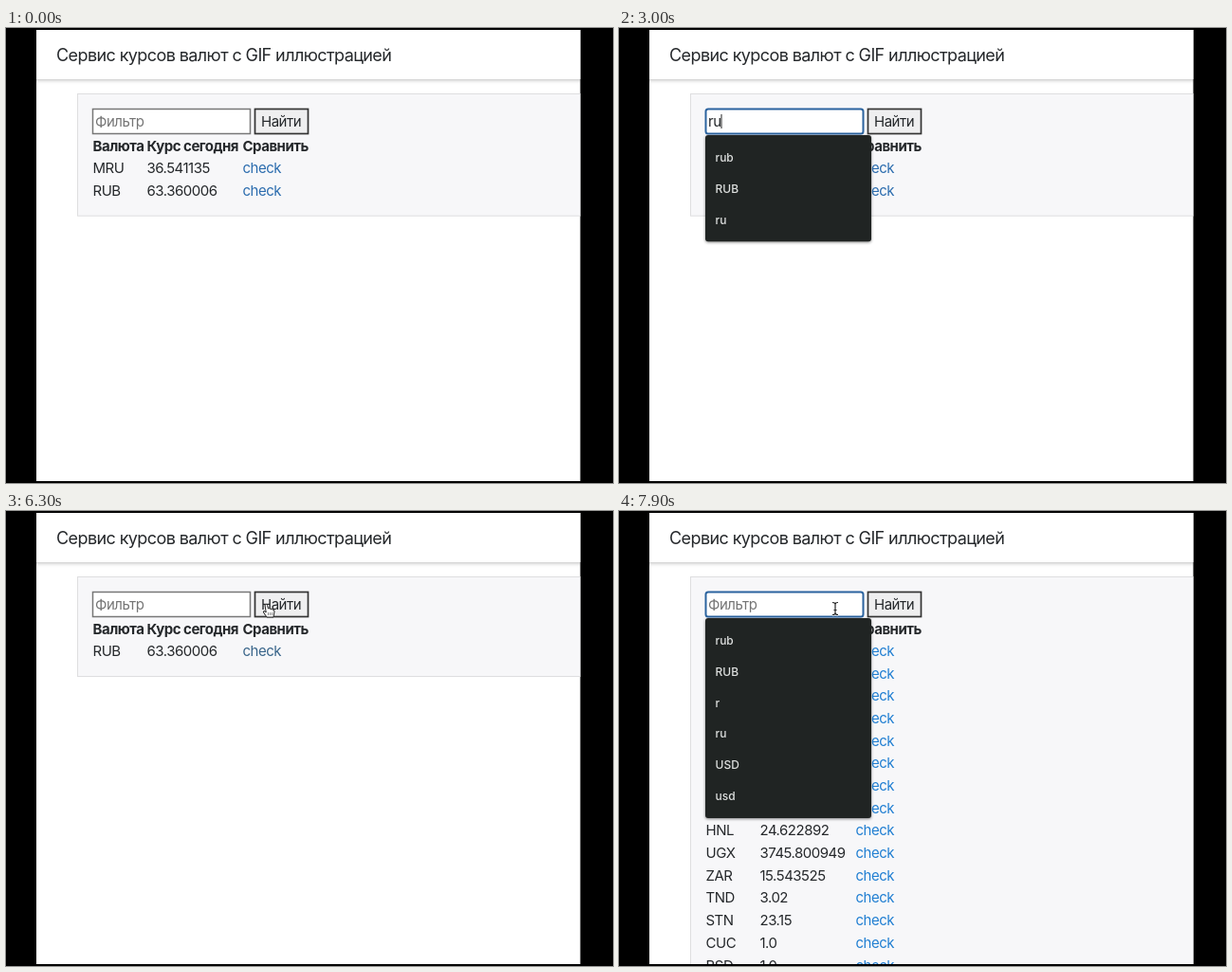
Animation of 640x480 px, one loop 8000 ms. Source, as an HTML page:

```html
<!DOCTYPE html>
<html lang="ru">
<head>
<meta charset="utf-8">
<style>
html, body { margin: 0; width: 100%; height: 100%; overflow: hidden; background: #000; }
svg { display: block; width: 640px; height: 480px; }
text { font: 15px Inter, sans-serif; letter-spacing: -.033em; fill: #25282b; white-space: pre; }
.title { font-size: 18px; }
.head { font-weight: 700; }
.hint { fill: #757575; }
.option { font-size: 12px; font-weight: 500; letter-spacing: 0; fill: #dfe1e0; }
</style>
</head>
<body>
<svg id="stage" viewBox="0 0 640 480"></svg>
<script>
const stage = document.getElementById('stage');
const LOOP = 8000, PITCH = 23.68;

const pair = [['MRU', '36.541135'], ['RUB', '63.360006']];
const all = `FJD 2.1368,MXN 19.54515,STD 22994.0,SCR 12.910622,CDF 2004.038697,BBD 2.0,GTQ 7.710011,
CLP 811.81,HNL 24.622892,UGX 3745.800949,ZAR 15.543525,TND 3.02,STN 23.15,CUC 1.0,BSD 1.0`
  .split(',').map(row => row.trim().split(' '));
const history = ['rub', 'RUB', 'r', 'ru', 'USD', 'usd'];

const text = (x, y, str, cls = '', style = '') =>
  `<text x="${x}" y="${y}" class="${cls}" style="${style}">${str}</text>`;
const rect = (x, y, w, h, attrs) =>
  `<rect x="${x}" y="${y}" width="${w}" height="${h}" ${attrs}/>`;
const between = (t, a, b) => t >= a && t < b;
const glide = (t, start, end, from, to) => {
  const p = Math.min(1, Math.max(0, (t - start) / (end - start)));
  const k = p * p * (3 - 2 * p);
  return from.map((v, i) => v + (to[i] - v) * k);
};

function table(rows, linkColor) {
  return rows.map(([code, rate], i) => {
    const y = 153 + i * PITCH;
    return text(91.5, y, code) + text(148.5, y, rate) + text(249.5, y, 'check', '', `fill:${linkColor}`);
  }).join('');
}

function field(query, focused, caret) {
  const border = focused
    ? 'rx="2.5" fill="#fff" stroke="#2b639f" stroke-width="2"'
    : 'fill="#fff" stroke="#777" stroke-width="1.5"';
  const n = query.length;
  return rect(91.5, 85.5, 166, 26, border)
    + text(94, 104, query || 'Фильтр', query ? '' : 'hint')
    + (caret ? rect(93.5 + (n && 8.5 * n - 3), 91, 1, 15, 'fill="#222"') : '');
}

function dropdown(query) {
  const options = history.filter(o => o.toLowerCase().startsWith(query));
  return rect(91, 113, 175, 13.5 + 32.9 * options.length,
    'rx="3" fill="#202423" style="filter:drop-shadow(0 1px 1.5px #0007)"')
    + options.map((o, i) => text(101.5, 141 + 32.8 * i, o, 'option')).join('');
}

function beam([x, y]) {
  const d = 'M-3-6.5Q0-6.5 0-4.5Q0-6.5 3-6.5M0-5V5M-3 6.5Q0 6.5 0 4.5Q0 6.5 3 6.5M-1.5 1.5H1.5';
  return `<g transform="translate(${x} ${y})" fill="none">
    <path d="${d}" stroke="#fff" stroke-width="2.6"/><path d="${d}" stroke="#222" stroke-width="1.2"/></g>`;
}

function hand([x, y]) {
  return `<path transform="translate(${x} ${y})" fill="#fff" stroke="#222" stroke-linejoin="round"
    d="M-4-6Q-2.5-7.5-1.5-5.5L-.5-2Q1-3 2-1.5Q3.5-2.5 4.2-.8Q6-1 6 1L5 7H-2L-5.5 2Q-6 0-4 .8L-2.8 2Z"/>
    <path transform="translate(${x} ${y})" stroke="#555" stroke-width=".7" d="M-.5 2V5M1.5 2V5M3.5 2V5"/>`;
}

function pointer(t) {
  if (between(t, 500, 2600)) return beam(glide(t, 500, 900, [192, 104], [180, 99]));
  if (between(t, 5900, 7000)) return hand(glide(t, 5900, 6200, [284, 106], [277, 105]));
  if (t >= 7000) return beam(glide(t, 6900, 7300, [277, 105], [228, 103]));
  return '';
}

function scene(t) {
  const listed = t >= 6900;
  const rows = listed ? all : t < 3800 ? pair : pair.slice(1);
  const link = listed ? '#217fd2' : t < 3800 ? '#2b6cae' : '#39658a';
  const query = between(t, 2600, 3800) ? 'rub'.slice(0, t < 3000 ? 1 : t < 3700 ? 2 : 3) : '';
  const focused = between(t, 1000, 3800) || t >= 7700;
  const open = between(t, 1600, 3800) || t >= 7800;
  const caret = between(t, 1000, 1500) || between(t, 1600, 2100) || between(t, 2600, 3500) || between(t, 3700, 3800);
  const pressed = between(t, 6500, 6700);

  return `<clipPath id="page">${rect(32, 2, 573.5, 476, '')}</clipPath><g clip-path="url(#page)">`
    + rect(32, 2, 574, 476, 'fill="#fff"')
    + rect(20, 0, 600, 54, 'fill="#fff" style="filter:drop-shadow(0 1px 2px #0004)"')
    + text(53, 34.5, 'Сервис курсов валют с GIF иллюстрацией', 'title')
    + rect(75.5, 69.5, 560, 81.3 + PITCH * rows.length, 'fill="#f7f7f9" stroke="#dedee0"')
    + field(query, focused, caret)
    + rect(262.5, 85.5, 56, 26, `fill="${pressed ? '#dcdcdc' : '#efeff0'}" stroke="#333" stroke-width="1.7"`)
    + text(269, 104, 'Найти')
    + text(91.5, 129.5, 'Валюта', 'head')
    + text(148.5, 129.5, 'Курс сегодня', 'head')
    + text(249.5, 129.5, 'Сравнить', 'head')
    + table(rows, link)
    + (open ? dropdown(query) : '')
    + pointer(t) + '</g>';
}

let shown = -1;
function tick() {
  const t = Math.floor(performance.now() % LOOP / 100) * 100;
  if (t !== shown) stage.innerHTML = scene(shown = t);
  requestAnimationFrame(tick);
}
tick();
</script>
</body>
</html>
```
